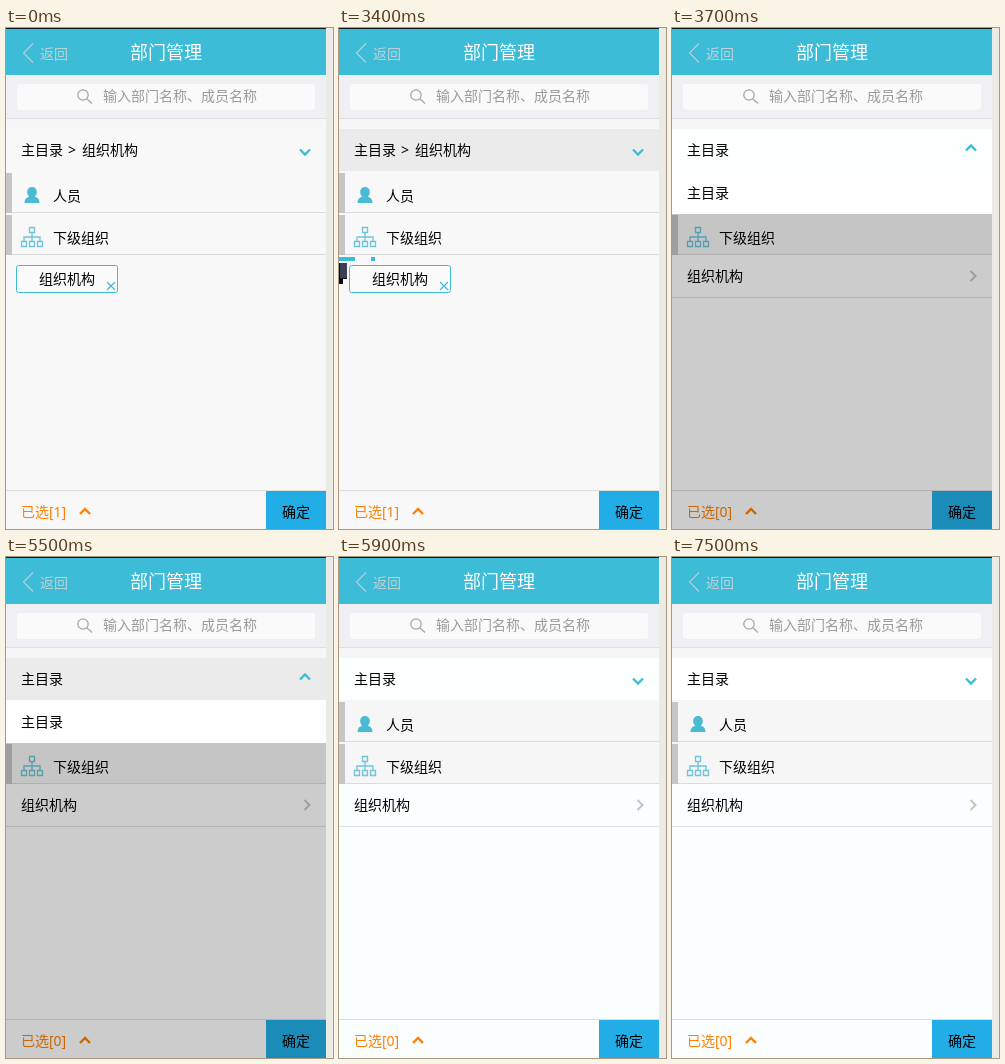
Write an HTML page that moves like this. It is 327x501 px and loops after 8 s.

```html
<!DOCTYPE html>
<html lang="zh-CN">
<head>
<meta charset="utf-8">
<title>部门管理</title>
<style>
html, body { margin: 0; width: 100%; height: 100%; overflow: hidden; background: #ebebe6; }
svg { display: block; width: 327px; height: 501px; }
text { font: 14px "Noto Sans", "Noto Sans CJK SC", "Noto Sans CJK", sans-serif; fill: #000; white-space: pre; }
.title { font-size: 18px; font-weight: 500; fill: #fff; }
.back { fill: #bfd0d3; }
.hint { fill: #9b9b9b; }
.count { fill: #ff8000; }
.line { fill: none; }
.cyan { stroke: #3dbcd8; }
</style>
</head>
<body>
<svg viewBox="0 0 327 501">
  <rect width="327" height="501" fill="#ebebe6"/>
  <rect id="page" width="320" height="501"/>

  <!-- title bar -->
  <rect width="320" height="47" fill="#3dbcd8"/>
  <rect width="320" height="1" fill="#10181a"/>
  <path class="line" d="M27 15.5L17.5 25L27 34.5" stroke="#b4cfd4" stroke-width="1.1"/>
  <text class="back" x="34" y="31">返回</text>
  <text class="title" x="124" y="31">部门管理</text>

  <!-- search -->
  <rect y="47" width="320" height="44" fill="#f0eff4"/>
  <rect y="91" width="320" height="10" fill="#f6f6f6"/>
  <rect y="90" width="320" height="1" fill="#e0e0e3"/>
  <rect x="11" y="56" width="298" height="26" rx="3" fill="#fafafa"/>
  <g class="line" stroke="#a3a3a3" stroke-width="1.2">
    <circle cx="77" cy="67" r="5.2"/><path d="M81 71L86 75.5"/>
  </g>
  <text class="hint" x="97" y="73">输入部门名称、成员名称</text>
  <rect id="input" x="22" y="61" width="288" height="16" fill="#fff"/>

  <!-- list -->
  <g>
    <rect id="rowBg" y="143" width="320" height="84"/>
    <path d="M0 145h6v40h-6zM0 187h6v40h-6z" fill="#c6c6c6"/>
    <path d="M6 184.5h314M6 226.5h314" stroke="#dcdcdc"/>
    <path d="M26 159c3 0 4.800 2.200 4.800 5c0 2-.8 3.700-2 4.700c3 .8 4.700 2.600 4.700 6.300H18.500c0-3.700 1.700-5.500 4.700-6.300c-1.200-1-2-2.700-2-4.700c0-2.800 1.800-5 4.800-5z" fill="#4bbad4"/>
    <path class="line" d="M23.500 199.500h5v5h-5zM15.500 213.500h5v5h-5zM23.500 213.500h5v5h-5zM31.500 213.500h5v5h-5zM26 205v8M18 213v-4h16v4" stroke="#6cc4d8" stroke-width="1.300"/>
    <text x="47" y="173">人员</text>
    <text x="47" y="215">下级组织</text>
  </g>

  <g id="chosen">
    <g id="blip">
      <path d="M0 229h16v4h-16zM32 229h4v4h-4z" fill="#3dbcd8"/>
      <path d="M0 235h8v16h-4v5h-4z" fill="#0c0d12"/>
      <path d="M1 235h7v15h-7z" fill="#3b4058"/>
    </g>
    <rect x="10.500" y="237.500" width="101" height="27" rx="2" fill="#fafafa" class="cyan"/>
    <text x="33" y="256">组织机构</text>
    <path class="line cyan" d="M101 254l8 8M109 254l-8 8" stroke-width="1.200"/>
  </g>
  <g id="child">
    <text x="15" y="253">组织机构</text>
    <path class="line" d="M298.500 243l5 5l-5 5" stroke="#c3c3c3" stroke-width="2"/>
    <path d="M0 269.500h320" stroke="#dfe2e2"/>
  </g>

  <!-- footer -->
  <path d="M0 462.500h320" stroke="#dedede"/>
  <text id="count" class="count" x="15" y="489"></text>
  <path class="line" d="M74 486l5-5l5 5" stroke="#ff8000" stroke-width="2.400"/>
  <rect x="260" y="463" width="60" height="38" fill="#22ade6"/>
  <text x="276" y="489">确定</text>

  <!-- dropdown -->
  <rect id="mask" y="143" width="320" height="358"/>
  <clipPath id="clip"><rect id="drop" y="143" width="320" height="0"/></clipPath>
  <g clip-path="url(#clip)">
    <rect y="143" width="320" height="43" fill="#fefefe"/>
    <text x="15" y="170">主目录</text>
  </g>

  <!-- breadcrumb -->
  <rect id="crumbBg" y="101" width="320" height="42"/>
  <text x="15" y="127">主目录</text>
  <g id="crumb">
    <text x="62" y="127">&gt;</text>
    <text x="76" y="127">组织机构</text>
  </g>
  <path id="arrow" class="line cyan" stroke-width="2.400"/>
</svg>
<script>
const LOOP = 8000, TICK = 100;
const $ = id => document.getElementById(id);
const show = (id, on) => $(id).setAttribute('visibility', on ? 'visible' : 'hidden');
const set = (id, name, value) => $(id).setAttribute(name, value);
const within = (t, a, b) => t >= a && t < b;
const ramp = (t, a, b) => Math.min(1, Math.max(0, (t - a) / (b - a)));

function draw(t) {
  const root = t >= 3500;
  const pressed = within(t, 3400, 3500) || within(t, 5500, 5600) || within(t, 7300, 7500);
  const open = ramp(t, 3400, 3700) - ramp(t, 5500, 5900);
  const up = within(t, 3500, 5600);

  show('input', within(t, 500, 1700));
  show('chosen', !root);
  show('blip', within(t, 3400, 3500));
  show('child', root);
  show('crumb', !root);
  $('count').textContent = root ? '已选[0]' : '已选[1]';

  set('page', 'fill', open > 0 ? '#fff' : root ? '#fafeff' : '#f8f8f8');
  set('rowBg', 'fill', root ? '#f6f6f6' : '#f8f8f8');
  set('crumbBg', 'fill', pressed ? '#ebebeb' : t >= 7500 ? '#fff' : root ? '#fbfffe' : '#f8f8f8');
  set('mask', 'opacity', 0.2 * open);
  set('drop', 'height', 43 * open);
  set('arrow', 'd', up ? 'M294 122.500l5-5l5 5' : 'M294 121.500l5 5l5-5');
}

const start = performance.now();
function frame() {
  const t = (performance.now() - start) % LOOP;
  draw(Math.floor(t / TICK) * TICK);
  requestAnimationFrame(frame);
}
frame();
</script>
</body>
</html>
```
